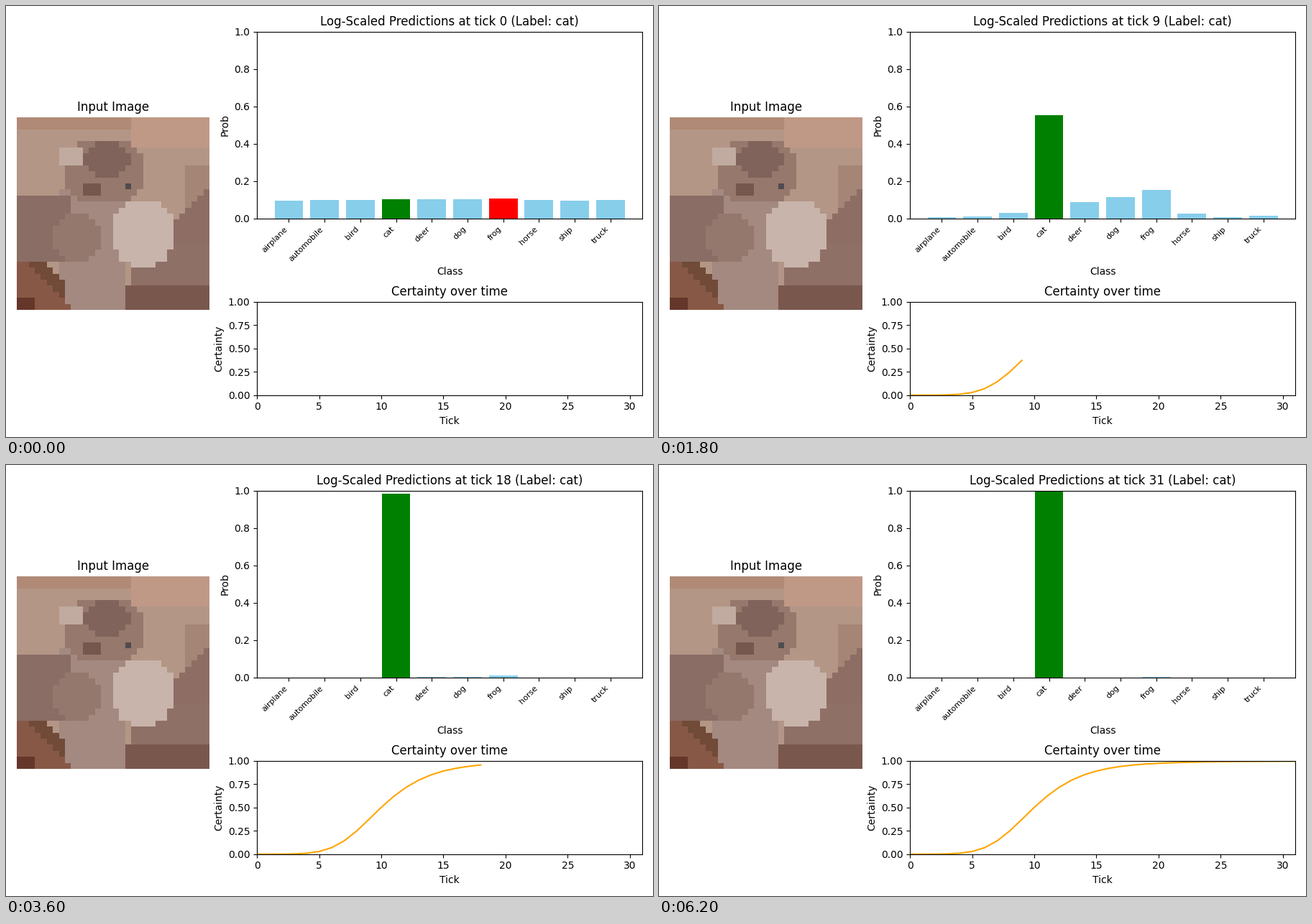
A matplotlib script for the animation above (6400 ms loop, 900x600 px).

```python
import numpy as np
import matplotlib.pyplot as plt
from matplotlib.animation import FuncAnimation
from matplotlib.colors import to_rgb

TICKS = 32
TICK_MS = 200
LABEL = "cat"

# How fast each class falls behind the true label.
GAPS = dict(airplane=2.34, automobile=2.1, bird=1.57, cat=0, deer=0.98,
            dog=0.83, frog=0.7, horse=1.59, ship=2.34, truck=1.94)
CLASSES = list(GAPS)
HEAD_START = np.array([0.04 if name == "frog" else 0 for name in CLASSES])


def evidence(tick):
    """Saturating growth of the lead of the true label."""
    growth = (tick / 16.6)**2.7
    return 0.03 + 11.6 * growth / (1 + growth)


def class_probabilities():
    lead = evidence(np.arange(TICKS))
    odds = np.exp(HEAD_START - np.outer(lead, list(GAPS.values())))
    return odds / odds.sum(axis=1, keepdims=True)


def input_picture(size=32):
    """A cat reduced to a few flat patches on a coarse grid."""
    y, x = np.mgrid[:size, :size] + 0.5
    image = np.full((size, size, 3), to_rgb("#b39686"))

    def fill(mask, color):
        image[mask] = to_rgb(color)

    def oval(cx, cy, rx, ry, color):
        fill(((x - cx) / rx)**2 + ((y - cy) / ry)**2 < 1, color)

    # Wall and floor
    fill(y < 2, "#b08a76")
    fill((x > 19) & (y < 5), "#c09886")
    fill((x > 28) & (y > 8), "#a58576")
    fill((x > 25) & (x + y > 43), "#8d6d64")
    fill((x > 19) & (y > 21), "#8f7066")
    fill((x > 18) & (y > 28), "#79574d")

    # Body, head and chest
    fill((x > 7) & (x < 18) & (y > 12), "#a38980")
    fill((x < 9) & (y > 13) & (y < 24), "#8a6d65")
    oval(10, 20, 4, 4, "#94776d")
    oval(14.5, 9, 7, 5.5, "#96786c")
    oval(15, 7, 4, 3, "#80635a")
    oval(9, 6.5, 2, 2, "#c1aaa0")
    oval(12.5, 12, 2, 1.5, "#75574d")
    oval(21, 19.2, 5.5, 5.6, "#c8b4aa")
    oval(18.5, 11.5, 1, 1, "#504c4e")

    # Dark corner
    fill((y > 23.8) & (x < np.minimum(8, y - 19.5)), "#714a38")
    fill((y > 24) & (x < y - 22.5), "#885846")
    fill((y > 30) & (x < 3), "#65362a")
    return image


probs = class_probabilities()
entropy = -(probs * np.log(probs)).sum(axis=1)
certainty = 1 - entropy / np.log(len(CLASSES))

fig = plt.figure(figsize=(9, 6), dpi=100)
grid = fig.add_gridspec(2, 2, width_ratios=[1, 2], height_ratios=[2, 1])
ax_image = fig.add_subplot(grid[:, 0])
ax_bars = fig.add_subplot(grid[0, 1])
ax_line = fig.add_subplot(grid[1, 1])

ax_image.imshow(input_picture())
ax_image.set_title("Input Image")
ax_image.axis("off")

bars = ax_bars.bar(CLASSES, probs[0])
ax_bars.set(ylim=(0, 1), xlabel="Class", ylabel="Prob")
plt.setp(ax_bars.get_xticklabels(), rotation=45, ha="right", fontsize=8)

curve, = ax_line.plot([], [], color="orange")
ax_line.set(xlim=(0, TICKS - 1), ylim=(0, 1), title="Certainty over time",
            xlabel="Tick", ylabel="Certainty")


def bar_color(name, predicted):
    if name == LABEL:
        return "green"
    return "red" if name == predicted else "skyblue"


def update(tick):
    predicted = CLASSES[probs[tick].argmax()]
    for name, bar, prob in zip(CLASSES, bars, probs[tick]):
        bar.set_height(prob)
        bar.set_facecolor(bar_color(name, predicted))
    ax_bars.set_title(f"Log-Scaled Predictions at tick {tick} (Label: {LABEL})")
    curve.set_data(np.arange(tick + 1), certainty[:tick + 1])
    return [*bars, curve]


update(0)
fig.tight_layout()
fig.subplots_adjust(top=1 - 35.7 / 600, hspace=0.595)
anim = FuncAnimation(fig, update, frames=TICKS, interval=TICK_MS,
                     repeat=True, repeat_delay=0)
plt.show()
```
